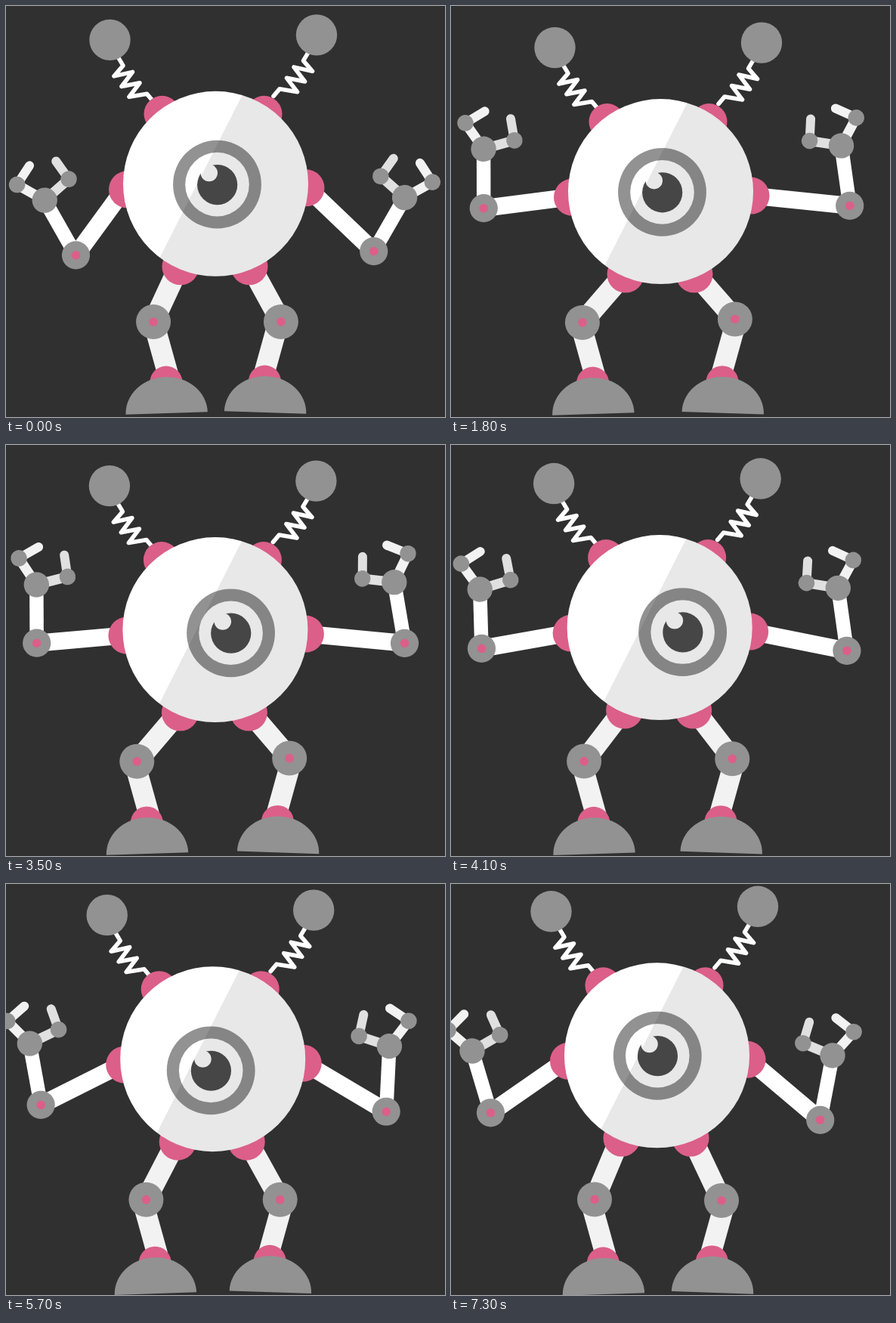
An HTML page with a canvas for the animation above (7400 ms loop, 581x544 px).

```html
<!DOCTYPE html>
<html lang="en">
<head>
<meta charset="utf-8">
<title>One-eyed robot</title>
<style>
  html, body { margin: 0; width: 100%; height: 100%; overflow: hidden; background: #303030; }
  canvas { display: block; width: 581px; height: 544px; }
</style>
</head>
<body>
<canvas id="stage"></canvas>
<script>
const W = 581, H = 544, LOOP = 7400, STEP = 100;
const PINK = '#db5f89', GREY = '#929292', WHITE = '#fff', PALE = '#f2f2f2', DIM = '#e0e0e0';

const canvas = document.getElementById('stage');
const ctx = canvas.getContext('2d');
const ratio = window.devicePixelRatio || 1;
canvas.width = W * ratio;
canvas.height = H * ratio;

const rad = degrees => degrees * Math.PI / 180;
const ease = u => (1 - Math.cos(Math.PI * u)) / 2;
const mix = (a, b, u) => a + (b - a) * u;

// The whole body crouches until 2.4 s, then rises again.
// Every moving value is given as [standing, crouched, risen].
let time = 0;
function swing([standing, crouched, risen]) {
  return time < 2.4
    ? mix(standing, crouched, ease((time + .3) / 2.7))
    : mix(crouched, risen, ease((time - 2.4) / 4.9));
}

const ARMS = [
  {
    side: -1, shoulder: [-121.5, 7.5], joint: -117,
    lift: [55.5, 1, 34.8], reach: [107.5, 114.5, 120],
    handX: [51.5, 42, 28], handY: [259.5, 180, 221], turn: [61.5, 31.5, 49.3]
  },
  {
    side: 1, shoulder: [121.5, 5.5], joint: 119.5,
    lift: [45, .7, 40.2], reach: [121, 130.5, 124],
    handX: [528, 515, 505], handY: [256, 175.5, 227], turn: [62, 23.5, 41.9]
  }
];
const LEGS = [
  {
    side: -1, hip: -46.5, ground: 539, sink: .55,
    kneeX: [195.8, 171, 190], kneeY: [418, 419, 417.5], footX: [213.5, 185, 202]
  },
  {
    side: 1, hip: 44.5, ground: 538, sink: .4,
    kneeX: [363.5, 377.5, 358], kneeY: [418, 414, 419], footX: [342.5, 362, 346]
  }
];
const ANTENNAE = [
  { side: -1, ball: [-140, -190.5], base: -71 },
  { side: 1, ball: [133.5, -197], base: 64 }
];
// Glances: time, then offset from the body centre.
const GLANCES = [[0, 2, .8], [2.6, 2, .8], [4.1, 30.5, 6], [5.7, -2.5, 15.2], [7.4, .8, .3]];

function disc(x, y, r, color) {
  ctx.fillStyle = color;
  ctx.beginPath();
  ctx.arc(x, y, r, 0, 2 * Math.PI);
  ctx.fill();
}

function path(points, width, color, cap = 'butt') {
  ctx.strokeStyle = color;
  ctx.lineWidth = width;
  ctx.lineCap = ctx.lineJoin = cap;
  if (cap === 'butt') ctx.lineJoin = 'miter';
  ctx.beginPath();
  points.forEach(p => ctx.lineTo(...p));
  ctx.stroke();
}

// Draws in a moved frame; side -1 mirrors it.
function placed(x, y, degrees, side, draw) {
  ctx.save();
  ctx.translate(x, y);
  ctx.scale(side, 1);
  ctx.rotate(rad(degrees));
  draw();
  ctx.restore();
}

function hand() {
  path([[0, 0], [40, 14]], 13, DIM);
  path([[40, 14], [52.4, -12.3]], 12, DIM, 'round');
  path([[0, 0], [0, -42]], 13, PALE);
  path([[0, -42], [30, -40]], 12, PALE, 'round');
  disc(0, -42, 10.8, GREY);
  disc(40, 14, 10.8, GREY);
  disc(0, 0, 16.7, GREY);
}

function arm(a, bx, by) {
  const sx = bx + a.shoulder[0], sy = by + a.shoulder[1];
  const lift = rad(swing(a.lift)), reach = swing(a.reach);
  const ex = sx + a.side * reach * Math.cos(lift), ey = sy + reach * Math.sin(lift);
  const hx = swing(a.handX), hy = swing(a.handY);
  path([[sx, sy], [ex, ey]], 23, WHITE);
  path([[ex, ey], [hx, hy]], 18.5, WHITE);
  // The hand is modelled for the left arm, so the right one is mirrored.
  placed(hx, hy, -swing(a.turn), -a.side, hand);
  disc(ex, ey, 18.6, GREY);
  disc(ex, ey, 5.8, PINK);
  disc(bx + a.joint, sy, 24.5, PINK);
}

function leg(l, bx, by) {
  const hx = bx + l.hip, hy = by + 109.5;
  const kx = swing(l.kneeX), ky = swing(l.kneeY);
  const fx = swing(l.footX), fy = l.ground + l.sink * time;
  path([[hx + 2 * l.side, hy], [kx, ky]], 27.5, PALE);
  // The shin keeps its slant and travels with the foot.
  path([[fx + 17 * l.side, 420], [fx - 3 * l.side, 492]], 27.5, PALE);
  disc(fx - .7, fy - 41, 21.5, PINK);
  placed(fx, fy, 1.9 * l.side, 1, () => {
    ctx.fillStyle = GREY;
    ctx.beginPath();
    ctx.ellipse(0, 0, 54.2, 48, 0, Math.PI, 2 * Math.PI);
    ctx.fill();
  });
  disc(kx, ky, 23, GREY);
  disc(kx, ky, 5.8, PINK);
  disc(hx, hy, 24.5, PINK);
}

function antenna(a) {
  const spring = [[11.5, 24], [17.5, 34]];
  for (let i = 0; i < 3; i++) {
    spring.push([5.5 + 10 * i, 48 + 13.7 * i], [30 + 9.5 * i, 42.5 + 14.5 * i]);
  }
  spring.push([57, 81]);
  placed(...a.ball, 0, -a.side, () => {
    path(spring, 5.6, WHITE, 'round');
    disc(0, 0, 27.2, GREY);
  });
  disc(a.base, -92.5, 24, PINK);
}

function gaze() {
  const next = GLANCES.findIndex(g => g[0] > time);
  const [t0, x0, y0] = GLANCES[next - 1], [t1, x1, y1] = GLANCES[next];
  const u = ease((time - t0) / (t1 - t0));
  return [mix(x0, x1, u), mix(y0, y1, u)];
}

function head() {
  disc(0, 0, 122.5, WHITE);
  placed(...gaze(), 0, 1, () => {
    disc(0, 0, 58.4, GREY);
    disc(0, 0, 42.3, WHITE);
    disc(.2, .4, 26.6, '#4d4d4d');
    disc(-10.7, -15.2, 11.2, WHITE);
  });
  // Shaded side, cut off by a slanted chord.
  ctx.fillStyle = 'rgba(0, 0, 0, .09)';
  ctx.beginPath();
  ctx.arc(0, 0, 122.5, Math.atan2(-117, 35), Math.atan2(97, -73.5));
  ctx.fill();
}

function draw() {
  ctx.setTransform(ratio, 0, 0, ratio, 0, 0);
  ctx.fillStyle = '#303030';
  ctx.fillRect(0, 0, W, H);
  const bx = swing([277.5, 277.5, 272.5]), by = swing([235, 247, 226.8]);
  LEGS.forEach(l => leg(l, bx, by));
  ARMS.forEach(a => arm(a, bx, by));
  placed(bx, by, 0, 1, () => {
    ANTENNAE.forEach(antenna);
    head();
  });
}

const start = performance.now();
function tick() {
  const ms = (performance.now() - start) % LOOP;
  let step = Math.floor(ms / STEP);
  if (step === 16 || step === 23) step--; // two held poses
  time = step * STEP / 1000;
  draw();
  requestAnimationFrame(tick);
}
tick();
</script>
</body>
</html>
```
